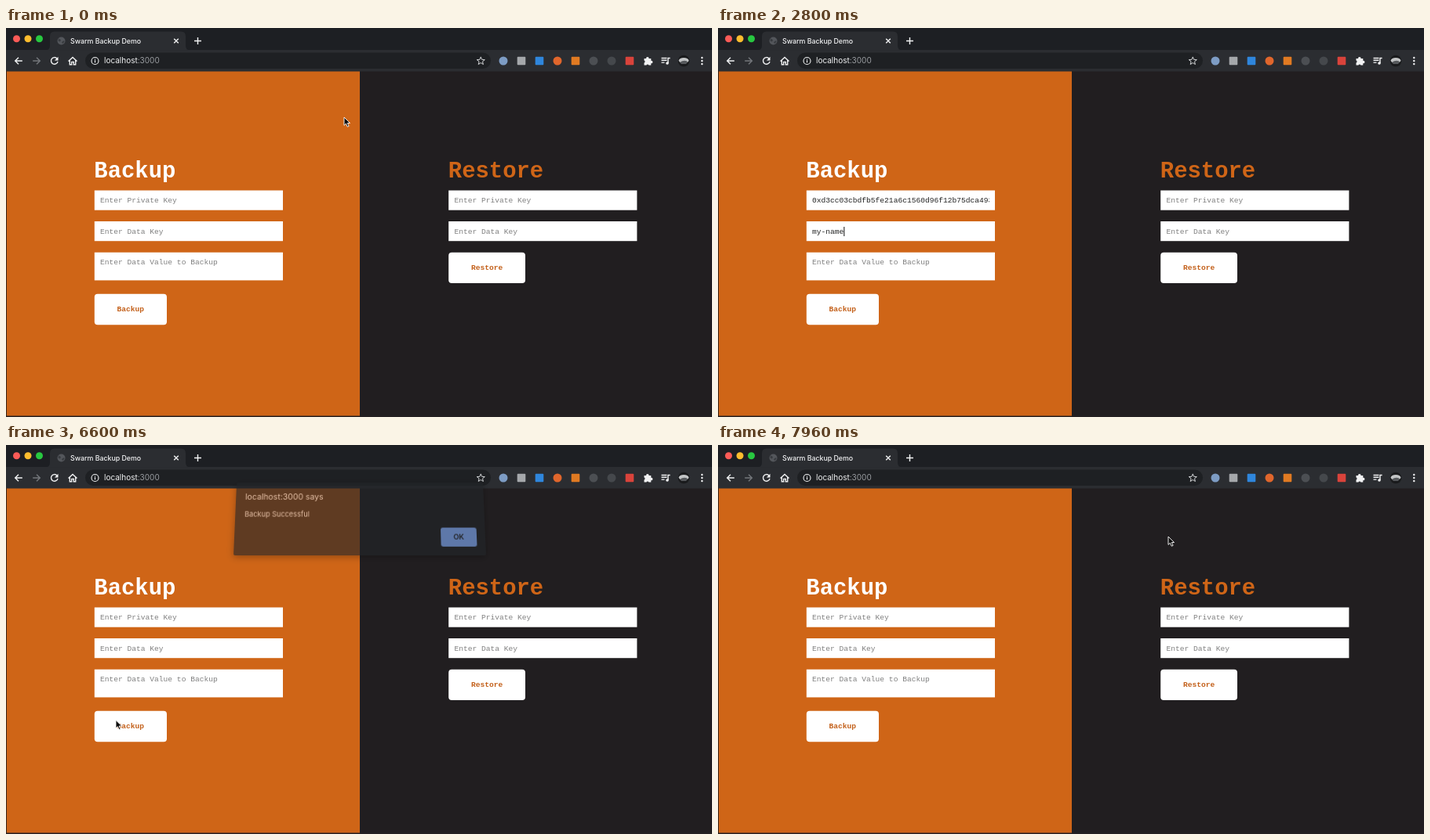
Animation of 900 by 497 pixels, one loop 8 s. Source, as an HTML page:

```html
<!DOCTYPE html>
<html lang="en">
<head>
<meta charset="utf-8">
<title>Backup demo</title>
<style>
  html, body { margin: 0; width: 100%; height: 100%; overflow: hidden; background: #211e20; }
  svg { position: absolute; left: 0; top: 0; display: block; }
  text { white-space: pre; }
  .ui { font-family: Inter, Roboto, sans-serif; }
  .mono { font-family: "Liberation Mono", "Courier New", monospace; font-size: 9.6px; }
  .title { font-family: "Liberation Mono", "Courier New", monospace; font-size: 28.9px; font-weight: 700; }
  .label { font-weight: 700; fill: #c3601a; }
  .hint { fill: #808080; }
  .line { fill: none; stroke: #f1f2f3; stroke-width: 1.4; }
  #dialog {
    position: absolute; left: 290px; top: 53px; width: 322px; height: 93px;
    background: #202326; border-radius: 2px; color: #f0f1f2;
    box-shadow: 0 2px 8px rgba(0, 0, 0, .45);
    transform-origin: 50% 100%;
    font-family: Inter, Roboto, sans-serif;
  }
  #dialog div { position: absolute; left: 12px; white-space: nowrap; }
  #dialog .head { top: 12px; font-size: 10.7px; line-height: 14px; }
  #dialog .body { top: 33.5px; font-size: 9.3px; line-height: 14px; }
  #dialog .ok {
    left: 265px; top: 58px; width: 46px; height: 23.5px; border-radius: 3px;
    background: #80aaf5; color: #202326; text-align: center;
    font-size: 9.3px; font-weight: 600; line-height: 23.5px;
  }
</style>
</head>
<body>
<svg width="900" height="497" viewBox="0 0 900 497">
  <defs>
    <clipPath id="keyClip"><rect x="120" y="208" width="226" height="25"/></clipPath>
  </defs>

  <!-- browser frame -->
  <rect width="900" height="56" fill="#1d1f23"/>
  <rect y="28" width="900" height="28" fill="#2b2d31"/>
  <path d="M50 28.5q6 0 6-6V10.500q0-6 6-6h161q6 0 6 6v12q0 6 6 6z" fill="#2b2d31"/>
  <circle cx="13.500" cy="13.800" r="4.500" fill="#fc5b57"/>
  <circle cx="28" cy="13.800" r="4.500" fill="#fdbd2e"/>
  <circle cx="42.500" cy="13.800" r="4.500" fill="#28c840"/>
  <circle cx="70.500" cy="16.500" r="5" fill="#53565b"/>
  <path d="M67 13.500l3 1.500-1 2.500-2.500-1zM71 18l3-2 .5 2-2.500 2z" fill="#383b3f"/>
  <text class="ui" x="82" y="19.600" font-size="8.800" font-weight="500" fill="#f1f2f3">Swarm Backup Demo</text>
  <path class="line" d="M214.200 13.700l5.600 5.600m0-5.600l-5.600 5.600M240 16.500h9m-4.500-4.500v9"/>

  <!-- toolbar -->
  <path class="line" d="M20.800 42h-9m4.200-4.300L11.700 42l4.300 4.300"/>
  <path class="line" d="M34.200 42h9M39 37.700l4.300 4.300-4.300 4.300" style="stroke:#74777b"/>
  <path class="line" d="M65 39a4.300 4.300 0 1 0 1 3.800"/>
  <path d="M66.500 36.800v4.600h-4.600z" fill="#f1f2f3"/>
  <path class="line" d="M79.500 42.500l5.500-5 5.500 5M81.300 41v5.700h2.400v-3.300h2.600v3.300h2.400V41"/>
  <rect x="101" y="31.500" width="517" height="20.500" rx="10.250" fill="#1e2023"/>
  <circle cx="113.500" cy="42" r="4.500" class="line" style="stroke-width:1.100"/>
  <path class="line" d="M113.500 41.300v3m0-4.900v1.100" style="stroke-width:1.200"/>
  <text class="ui" x="125" y="45.400" font-size="10" fill="#f1f2f3">localhost<tspan fill="#9a9da1">:3000</tspan></text>
  <path id="star" fill="none" stroke="#d2d4d6" stroke-width="1"/>
  <g id="badges"></g>
  <path d="M813.500 39h2.700a1.700 1.700 0 1 1 3.300 0h2.800v2.800a1.700 1.700 0 1 1 0 3.300v2.400h-2.900a1.600 1.600 0 0 0-3 0h-2.900v-2.900a1.600 1.600 0 0 0 0-3z" fill="#f1f2f3"/>
  <path class="line" d="M835.500 38.500h7m-7 2.800h7m-7 2.800h4M844 45v-6.500h2.600"/>
  <circle cx="843" cy="45" r="1.800" fill="#f1f2f3"/>
  <circle cx="864" cy="42" r="7.300" fill="#191a1c"/>
  <ellipse cx="864" cy="41.500" rx="6.400" ry="3.500" fill="#c2c4c5"/>
  <path d="M859 44q5-4 10-1l-2 3h-6z" fill="#56595c"/>
  <g fill="#f1f2f3">
    <circle cx="887.300" cy="38" r="1.200"/><circle cx="887.300" cy="42" r="1.200"/><circle cx="887.300" cy="46" r="1.200"/>
  </g>

  <!-- page -->
  <rect y="55.500" width="451" height="440.500" fill="#cf6517"/>
  <rect x="451" y="55.500" width="449" height="440.500" fill="#211e20"/>
  <rect y="55" width="1" height="442" fill="#3a2618"/>
  <rect y="495.500" width="900" height="1.500" fill="#242022"/>
  <text class="title" x="112.300" y="190.500" fill="#fff">Backup</text>
  <text class="title" x="563.800" y="190.500" fill="#cf6517">Restore</text>
  <g fill="#fff">
    <rect x="112.800" y="207.500" width="240.200" height="25.200"/>
    <rect x="112.800" y="247" width="240.200" height="25.200"/>
    <rect x="112.800" y="286.700" width="240.200" height="35.700"/>
    <rect x="112.800" y="339.700" width="92.200" height="39.500" rx="4"/>
    <rect x="564.200" y="207.500" width="240.200" height="25.200"/>
    <rect x="564.200" y="247" width="240.200" height="25.200"/>
    <rect x="564.200" y="286.700" width="97.800" height="39.300" rx="4"/>
  </g>
  <g clip-path="url(#keyClip)"><text id="secret" class="mono" x="120" y="223"></text></g>
  <text id="name" class="mono" x="120" y="262.500"></text>
  <text id="value" class="mono" x="120" y="302.200"></text>
  <text class="mono hint" x="571.500" y="223">Enter Private Key</text>
  <text class="mono hint" x="571.500" y="262.500">Enter Data Key</text>
  <text class="mono label" x="141.500" y="362.300">Backup</text>
  <text class="mono label" x="593" y="309.300">Restore</text>
  <rect id="caret" width="1" height="12" fill="#111"/>
</svg>

<div id="dialog">
  <div class="head">localhost:3000 says</div>
  <div class="body">Backup Successful</div>
  <div class="ok">OK</div>
</div>

<svg width="900" height="497" viewBox="0 0 900 497" style="pointer-events:none">
  <g id="pointer">
    <path id="arrow" d="M0 0v10.400l2.400-2.200 1.800 4 1.900-.8-1.800-3.900h3.300z" fill="#0b0b0b" stroke="#fff" stroke-width=".9"/>
    <path id="beam" d="M-2.700-5.700q2.700 0 2.700 1.600 0-1.600 2.700-1.600M0-4.500v9M-2.700 5.700Q0 5.700 0 4.100q0 1.600 2.700 1.600M-1.300.9h2.600" fill="none" stroke="#111" stroke-width="1.100"/>
  </g>
</svg>

<script>
const LOOP = 8000, ADVANCE = 9.6 * 0.6, LEFT = 120, RIGHT = 346;
const $ = id => document.getElementById(id);
const clamp = v => Math.min(1, Math.max(0, v));
const easeOut = v => 1 - (1 - v) ** 2;

const SECRET = "0xd3cc03cbdfb5fe21a6c1560d96f12b75dca493" + "7be01f84a2c65d39e8b0714fc2";
const PASTE = 1000, CLICK = 6340, SUBMIT = 6480, OPEN = 6520, CLOSE = 7660;

// each field: focus span, text and its typing start and pace
const fields = [
  { el: $("secret"), hint: "Enter Private Key", text: SECRET, from: 760, to: 1480, start: PASTE, pace: 0, caretY: 214 },
  { el: $("name"), hint: "Enter Data Key", text: "my-name", from: 1480, to: 3160, start: 1840, pace: 140, caretY: 254 },
  { el: $("value"), hint: "Enter Data Value to Backup", text: "My name is Evan.", from: 3160, to: CLICK, start: 3360, pace: 140, caretY: 293 }
];

// pointer stops: time, x, y
const stops = [
  [0, 431, 114], [160, 431, 114], [700, 258, 220], [1080, 258, 220], [1420, 269, 255],
  [2860, 269, 255], [3100, 262, 302], [5740, 262, 302], [6240, 140, 351.5],
  [6720, 140, 351.5], [7120, 430.5, 247], [7480, 574, 117], [LOOP, 574, 117]
];
const hidden = [[1840, 2860], [3360, 5740]];
const rows = [[207, 233], [247, 272], [287, 322]];

// speed at a stop: zero at rests, else the mean over both neighbours
function speed(i, axis) {
  const a = stops[i - 1], b = stops[i], c = stops[i + 1];
  if (!a || !c || a[1] === b[1] || b[1] === c[1]) return 0;
  return (c[axis] - a[axis]) / (c[0] - a[0]);
}

function pointerAt(t) {
  const i = stops.findIndex(s => s[0] > t);
  const a = stops[i - 1], b = stops[i];
  const span = b[0] - a[0], k = (t - a[0]) / span;
  return [1, 2].map(axis =>
    a[axis] + (b[axis] - a[axis]) * k * k * (3 - 2 * k) +
    span * k * (1 - k) * (speed(i - 1, axis) * (1 - k) - speed(i, axis) * k));
}

function typed(f, t) {
  if (t < f.start || t >= SUBMIT) return 0;
  return f.pace ? Math.min(f.text.length, 1 + Math.floor((t - f.start) / f.pace)) : f.text.length;
}

function drawFields(t) {
  let caret = false;
  for (const f of fields) {
    const n = typed(f, t);
    const focused = t >= f.from && t < f.to;
    const scroll = focused ? Math.max(0, n * ADVANCE - (RIGHT - LEFT)) : 0;
    f.el.textContent = n ? f.text.slice(0, n) : f.hint;
    f.el.setAttribute("fill", n ? "#222" : "#808080");
    f.el.setAttribute("x", LEFT - scroll);
    if (!focused) continue;
    const lastKey = n ? f.start + (n - 1) * f.pace : f.from;
    caret = Math.floor((t - lastKey) / 500) % 2 === 0;
    $("caret").setAttribute("x", Math.min(LEFT + n * ADVANCE, RIGHT - 1));
    $("caret").setAttribute("y", f.caretY);
  }
  $("caret").style.display = caret ? "" : "none";
}

function drawDialog(t) {
  const p = easeOut(clamp((t - OPEN) / 200)) * (1 - clamp((t - CLOSE) / 120));
  const q = 1 - p, style = $("dialog").style;
  style.display = p > 0 ? "" : "none";
  style.opacity = p;
  style.transform = q ? `translateY(${-14 * q}px) perspective(380px) rotateX(${16.7 * q}deg) scaleY(${1 + 0.083 * q})` : "none";
}

function drawPointer(t) {
  const [x, y] = pointerAt(t);
  const overField = x > 113 && x < 353 && rows.some(([a, b]) => y > a && y < b);
  $("pointer").setAttribute("transform", `translate(${x} ${y})`);
  $("pointer").style.display = hidden.some(([a, b]) => t >= a && t < b) ? "none" : "";
  $("arrow").style.display = overField ? "none" : "";
  $("beam").style.display = overField ? "" : "none";
}

function drawBadges() {
  const badges = [
    ["circle", "#7d9cc4"], ["square", "#a5a8ab"], ["square", "#2f86dc"], ["circle", "#e0662c"],
    ["square", "#e07a22"], ["circle", "#4c4f53"], ["circle", "#45484c"], ["square", "#d9433b"]
  ];
  $("badges").innerHTML = badges.map(([shape, fill], i) => {
    const x = 634 + i * 23;
    return shape === "circle"
      ? `<circle cx="${x}" cy="42" r="5.5" fill="${fill}"/>`
      : `<rect x="${x - 5.3}" y="36.7" width="10.6" height="10.6" rx="1" fill="${fill}"/>`;
  }).join("");
}

function drawStar() {
  const points = Array.from({ length: 10 }, (_, i) => {
    const r = i % 2 ? 2.3 : 5.3, a = i * Math.PI / 5 - Math.PI / 2;
    return `${605.3 + r * Math.cos(a)} ${42.2 + r * Math.sin(a)}`;
  });
  $("star").setAttribute("d", `M${points.join("L")}Z`);
}

function frame() {
  const t = performance.now() % LOOP;
  drawFields(t);
  drawDialog(t);
  drawPointer(t);
  requestAnimationFrame(frame);
}

drawBadges();
drawStar();
frame();
</script>
</body>
</html>
```
